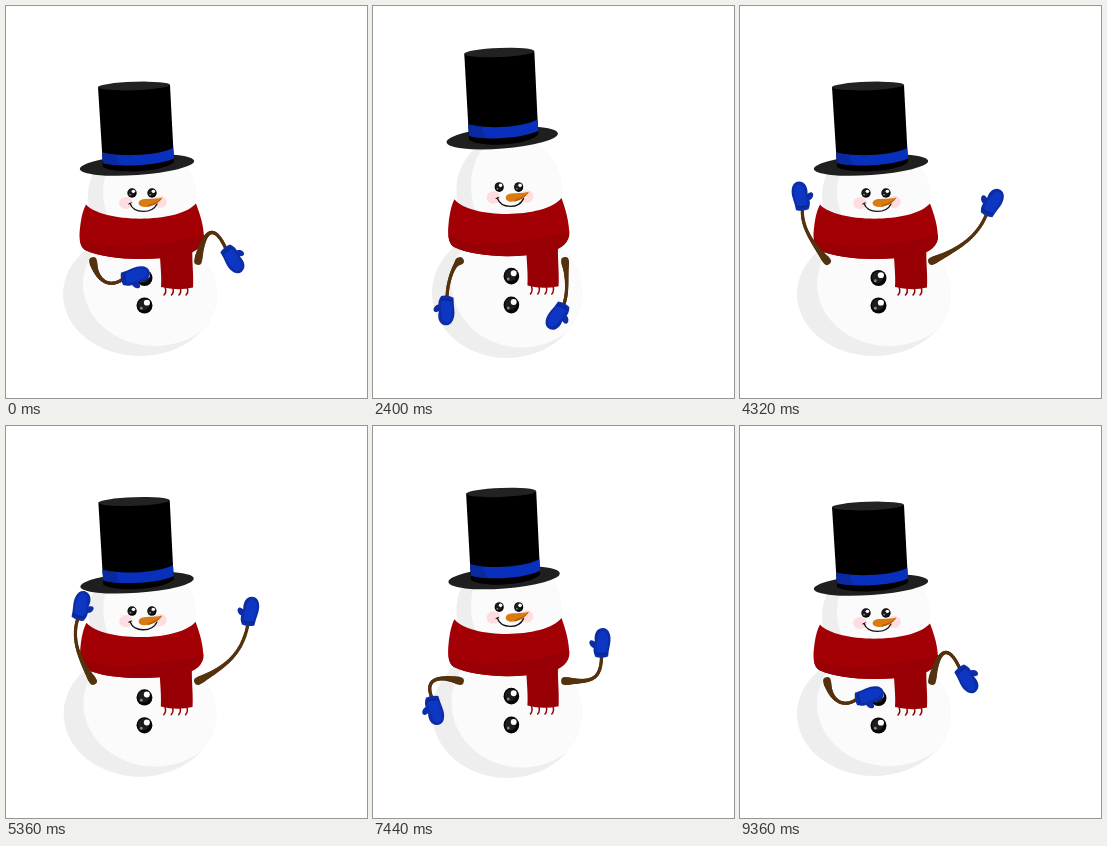
Animation, 361 px wide and 392 px high, one loop 9400 ms. Source, as an HTML page with a canvas:

```html
<!DOCTYPE html>
<html lang="en">
<head>
<meta charset="utf-8">
<title>Dancing snowman</title>
<style>
html, body { margin: 0; width: 100%; height: 100%; overflow: hidden; background: #fff; }
canvas { display: block; }
</style>
</head>
<body>
<canvas id="stage" width="361" height="392"></canvas>
<script>
const ctx = document.getElementById('stage').getContext('2d');
const STEP = 40, FRAMES = 235, BOB = 9;

// Arm poses relative to the shoulder, x outward:
// two curve handles, the wrist, and the mitten angle (clockwise from up).
const POSES = {
  belly:   [-4, 22, -18, 27, -30, 18, 280],
  low:     [-2, 24, -12, 28, -26, 25, 265],
  down:    [4, 16, 10, 34, 8, 53, 182],
  hook:    [8, -42, 20, -30, 28, -12, 141],
  hang:    [20, -10, 40, -10, 39, 18, 180],
  spread:  [16, -14, 38, -18, 55, -12, 105],
  droop:   [14, -8, 32, -14, 45, -3, 123],
  reachR:  [24, -6, 48, -14, 69, -18, 80],
  reachL:  [18, -6, 38, -14, 53, -20, 75],
  up:      [27, -14, 44, -26, 50, -57, 5],
  head:    [14, -22, 22, -42, 15, -63, -20],
  hip:     [22, -6, 36, -2, 28, 17, 188],
  waveIn:  [24, 2, 36, 4, 35, -23, -5],
  waveOut: [26, -10, 38, -18, 48, -43, 18]
};

const LEFT = [
  [0, 'belly'], [9, 'down'], [18, 'hook'], [27, 'down'], [36, 'low'], [45, 'down'],
  [54, 'hook'], [63, 'down'], [72, 'hang'], [82, 'droop'], [100, 'reachL'], [112, 'head'],
  [122, 'reachL'], [134, 'head'], [143, 'head'], [160, 'hip'], [221, 'hip'], [234, 'belly']
];
const RIGHT = [
  [0, 'hook'], [9, 'down'], [18, 'belly'], [27, 'down'], [36, 'hang'], [45, 'down'],
  [54, 'belly'], [63, 'down'], [72, 'hook'], [82, 'spread'], [100, 'reachR'], [112, 'up'],
  [122, 'reachR'], [134, 'up'], [144, 'up']
];
for (let f = 157, out = true; f <= 220; f += 9, out = !out) RIGHT.push([f, out ? 'waveOut' : 'waveIn']);
RIGHT.push([234, 'hook']);

const mix = (a, b, t) => a + (b - a) * t;

function poseAt(track, f) {
  let i = 0;
  while (i < track.length - 2 && track[i + 1][0] <= f) i++;
  const [t0, a] = track[i], [t1, b] = track[i + 1];
  const u = Math.min(1, (f - t0) / (t1 - t0));
  const e = (1 - Math.cos(Math.PI * u)) / 2;
  return POSES[a].map((v, k) => mix(v, POSES[b][k], e));
}

function shape(d, color) {
  ctx.fillStyle = color;
  ctx.fill(new Path2D(d));
}

function line(d, color, width) {
  ctx.strokeStyle = color;
  ctx.lineWidth = width;
  ctx.lineCap = 'round';
  ctx.stroke(new Path2D(d));
}

function oval(x, y, rx, ry, color, turn = 0) {
  ctx.fillStyle = color;
  ctx.beginPath();
  ctx.ellipse(x, y, rx, ry, turn, 0, Math.PI * 2);
  ctx.fill();
}

// A grey ball with a lighter oval clipped inside it.
function snowball(x, y, rx, ry, lx, ly, lrx, lry) {
  ctx.save();
  oval(x, y, rx, ry, '#eeeeee');
  ctx.clip();
  oval(lx, ly, lrx, lry, '#fbfbfb');
  ctx.restore();
}

function shine(x, y, r) {
  oval(x, y, r, r, '#050505');
  oval(x - r * 0.1, y - r * 0.1, r * 0.72, r * 0.72, '#1d1d1d');
  oval(x + r * 0.3, y - r * 0.35, r * 0.38, r * 0.36, '#fff');
  oval(x - r * 0.4, y + r * 0.35, r * 0.18, r * 0.18, '#888');
}

function face() {
  oval(120, 197, 7, 6, '#fddde1');
  oval(154, 196, 7, 6, '#fddde1');
  shine(126, 187, 4.7);
  shine(146, 187, 4.7);
  line('M124 197.5 C128 208 146 208 151 198', '#111', 1.3);
  line('M122.7 198 L125.3 196.8', '#111', 1);
  shape('M134 194.5 C139 191.5 147 194 156.5 191.5 C153 197 146 200.5 139 201 C133 201 131 197 134 194.5 Z', '#d97a12');
  shape('M143 198.5 C148 197.5 153 195 156.5 191.5 C153 197 147 200 141 201 Z', '#b85f08');
}

function scarf() {
  shape('M154 236 L187 234 C185 252 188 266 187 281.5 Q171 285 155 281 C156 266 153 252 154 236 Z', '#970004');
  for (const x of [159, 166.5, 174, 181]) line(`M${x} 281 Q${x + 2} 286 ${x - 1} 289`, '#970004', 1.5);
  shape('M80 198.5 C96 217 172 218 190 197.5 C194 208 198 220 198 233 C196 243 186 248 172 250 C142 255 100 254 79 244 C73 240 73 230 74 222 C75 212 77 204 80 198.5 Z', '#a30006');
  shape('M74 232 C90 243 130 245 198 229 C198 242 186 248 172 250 C142 255 100 254 79 244 C75 241 74 237 74 232 Z', '#990005');
}

function hat() {
  oval(131, 159, 57.3, 10, '#1f1f1f', -0.07);
  shape('M92 81 L164 79 L168 156 C156 167 108 168 97 161 Z', '#000');
  shape('M96.2 146.5 C114 151 150 150 167.3 142 L168 152.5 C152 160 112 161.5 97 157 Z', '#0930bd');
  shape('M96.2 146.5 Q103 148.3 110 148.8 Q110 154 114 159.2 Q104 159 97 157 Z', '#0829a0');
  oval(128, 80, 36, 4.2, '#222', -0.035);
}

function mitten() {
  shape('M-6 1 C-8 -3 -8 -6 -7.5 -8 C-11 -9 -13 -14 -10.5 -15.5 C-9 -16.5 -7.5 -15 -6 -14.5 C-7 -21 -4 -27.5 2 -27.5 C9 -27.5 11 -19 9 -11 C8 -7 7 -3 6.5 1 Q0 3 -6 1 Z', '#0c2da6');
  shape('M-4 -3 C-6 -8 -4 -12 -3 -17 C-2 -24 2 -26 5 -24 C9 -20 7 -11 5 -3 Z', '#0d37c2');
  line('M-5 -2.5 Q0 -1 5.5 -2.5', '#0a2585', 0.9);
}

function arm(x, y, side, pose) {
  const [ax, ay, bx, by, wx, wy, turn] = pose;
  const at = (t, a, b, w) => 3 * t * (1 - t) * (1 - t) * a + 3 * t * t * (1 - t) * b + t * t * t * w;
  ctx.save();
  ctx.translate(x, y);
  ctx.scale(side, 1);
  ctx.strokeStyle = '#55320f';
  ctx.lineCap = 'round';
  const n = 28;
  for (let i = 0; i < n; i++) {
    const t = i / n, u = (i + 1) / n;
    ctx.lineWidth = 3.2 + 4.6 * Math.pow(1 - t, 5);
    ctx.beginPath();
    ctx.moveTo(at(t, ax, bx, wx), at(t, ay, by, wy));
    ctx.lineTo(at(u, ax, bx, wx), at(u, ay, by, wy));
    ctx.stroke();
  }
  ctx.translate(wx, wy);
  ctx.rotate(turn * Math.PI / 180);
  mitten();
  ctx.restore();
}

// Height of the hat above the head while it is tossed.
function toss(f) {
  const u = (f - 72.5) / 14.5;
  return Math.max(0, 74 * (1 - u * u));
}

function draw(f) {
  const k = f % BOB, bob = Math.min(k, BOB - k) / 4;
  ctx.fillStyle = '#fff';
  ctx.fillRect(0, 0, 361, 392);

  ctx.save();
  ctx.translate(134, 310);
  ctx.scale(1 - 0.035 * bob, 1 + 0.064 * bob);
  ctx.translate(-134, -310);
  snowball(134, 288, 77, 62, 149, 278, 72, 62);
  shine(138.5, 272, 8);
  shine(138.5, 299.5, 8);
  snowball(136, 190, 54, 52, 153, 186, 56, 58);
  face();
  scarf();

  const lift = toss(f);
  ctx.translate(-0.1 * lift, -lift + 160);
  ctx.scale(1, 1 + 0.04 * bob);
  ctx.translate(0, -160);
  hat();
  ctx.restore();

  arm(87, 255, -1, poseAt(LEFT, f));
  arm(192, 255, 1, poseAt(RIGHT, f));
}

const start = performance.now();
function tick() {
  draw(Math.floor((performance.now() - start) / STEP) % FRAMES);
  requestAnimationFrame(tick);
}
tick();
</script>
</body>
</html>
```
